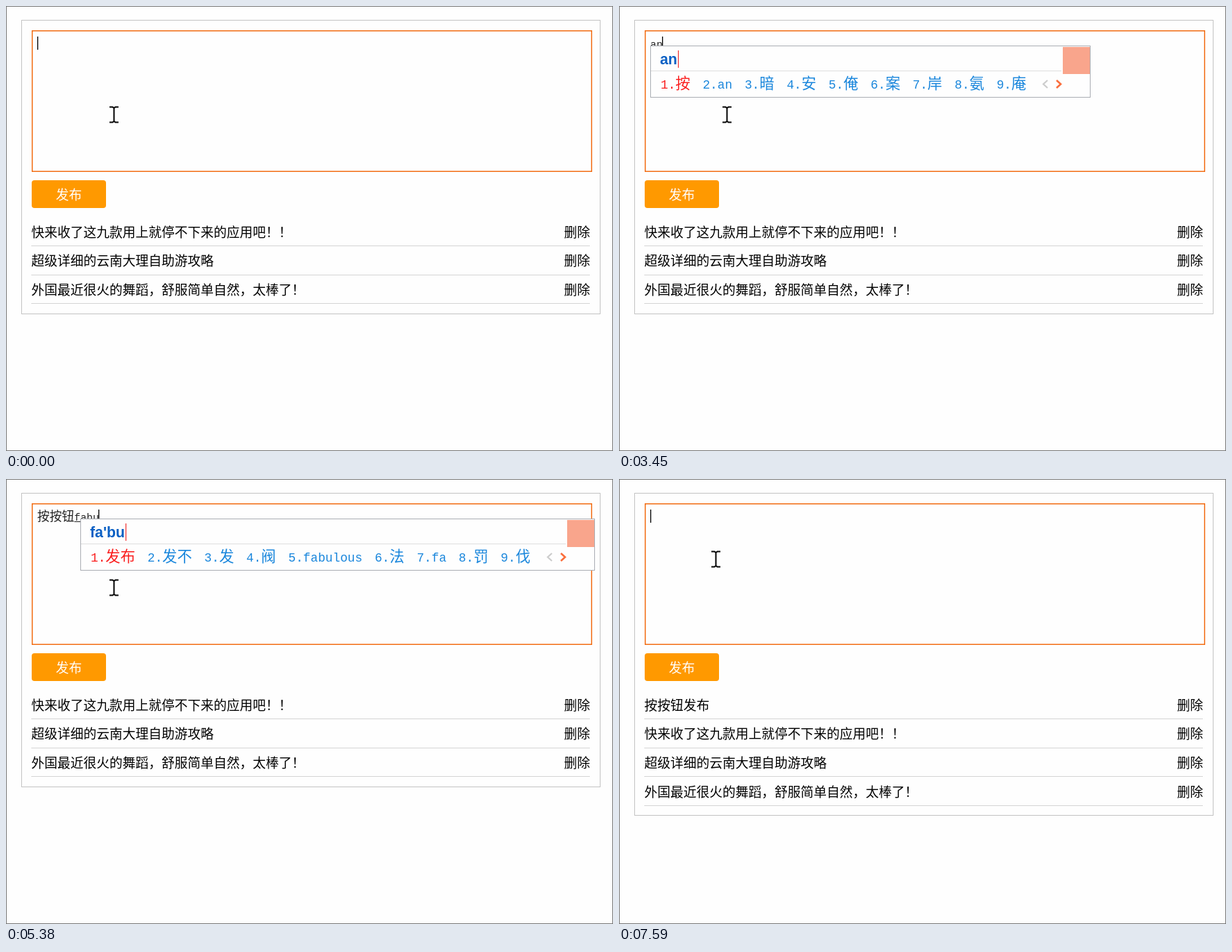
An HTML page for the animation above (8000 ms loop, 874 by 641 pixels).

```html
<!DOCTYPE html>
<html lang="zh-CN">
<head>
<meta charset="utf-8">
<title>发布</title>
<style>
html, body { margin: 0; width: 100%; height: 100%; overflow: hidden; background: #fefefe; }
svg { display: block; width: 874px; height: 641px; }
text { font-family: "Noto Sans CJK SC", "Noto Sans CJK", sans-serif; white-space: pre; }
.ui { font-size: 18.75px; fill: #000; }
.song { font-weight: 300; }
.song .half { font-family: "Liberation Mono", monospace; }
.pinyin { font: bold 21.33px "Liberation Sans", sans-serif; fill: #0a60c4; }
.hint { font-size: 18px; font-weight: 300; fill: #aaa; }
</style>
</head>
<body>
<svg id="stage" viewBox="0 0 874 641"></svg>
<script>
const LOOP = 8000, LEFT = 45, EM = 17.78, CAND_EM = 21.33;

const POSTS = ['快来收了这九款用上就停不下来的应用吧！！', '超级详细的云南大理自助游攻略', '外国最近很火的舞蹈，舒服简单自然，太棒了！'];

const WORDS = {
  an: '按 an 暗 安 俺 案 岸 氨 庵',
  "an'u": '按钮 俺奶奶 安暖 安能 Olv 按捺 按你 安宁 按年',
  fa: '发 法 阀 罚 fa 伐 乏 筏 珐',
  "fa'bu": '发布 发不 发 阀 fabulous 法 fa 罚 伐'
};

// Each step changes only the listed fields.
const STEPS = [
  [0, { text: '', comp: '', ime: null, hint: false, caret: true, selected: false, focus: true, posts: POSTS, mouse: ['beam', 155.5, 156.5] }],
  [560, { caret: false }],
  [1000, { text: '1', caret: true }],
  [1280, { text: '11' }],
  [1400, { text: '111' }],
  [1710, { text: '1111' }],
  [2270, { selected: true, caret: false }],
  [3450, { text: '', comp: 'an', ime: ['an', 45], selected: false, caret: true }],
  [3830, { hint: true }],
  [3970, { ime: null, hint: false }],
  [4100, { text: '按', comp: '' }],
  [4380, { comp: 'an', ime: ['an', 72] }],
  [4520, { comp: 'anu', ime: ["an'u", 72] }],
  [4950, { text: '按按钮', comp: '', ime: null }],
  [5100, { comp: 'fa', ime: ['fa', 107] }],
  [5380, { comp: 'fabu', ime: ["fa'bu", 107] }],
  [5500, { text: '按按钮发布', comp: '', ime: null }],
  [6060, { caret: false }],
  [6180, { mouse: ['beam', 146.5, 176.5] }],
  [6300, { mouse: ['beam', 128.5, 203.5] }],
  [6450, { mouse: ['beam', 115.5, 227.5] }],
  [6600, { caret: true, mouse: ['arrow', 99.5, 260.5] }],
  [6760, { caret: false, focus: false }],
  [6880, { text: '', posts: ['按按钮发布', ...POSTS] }],
  [7310, { mouse: ['beam', 128.5, 198.5] }],
  [7440, { mouse: ['beam', 139.5, 115.5] }],
  [7590, { caret: true, focus: true }]
];

const stage = document.getElementById('stage');

function add(tag, attrs, content = '') {
  const el = document.createElementNS('http://www.w3.org/2000/svg', tag);
  for (const key in attrs) el.setAttribute(key, attrs[key]);
  el.textContent = content;
  stage.append(el);
  return el;
}

const rect = (x, y, width, height, fill, more) => add('rect', { x, y, width, height, fill, ...more });
const frame = (x, y, w, h, stroke, line = 1) =>
  rect(x + line / 2, y + line / 2, w - line, h - line, 'none', { stroke, 'stroke-width': line });
const path = (d, stroke, line, more) => add('path', { d, fill: 'none', stroke, 'stroke-width': line, ...more });
const label = (x, y, cls, str, more) => add('text', { x, y, class: cls, ...more }, str);
const units = str => [...str].reduce((n, c) => n + (c < '\u0100' ? 0.5 : 1), 0);

// Half-width characters take exactly half an em next to full-width ones.
function song(x, y, str, em, fill) {
  const el = label(x, y, 'song', '', { fill, 'font-size': em });
  for (const run of str.match(/[\x00-\xff]+|[^\x00-\xff]+/g) || []) {
    const span = document.createElementNS(el.namespaceURI, 'tspan');
    span.textContent = run;
    if (run < '\u0100') {
      span.setAttribute('class', 'half');
      span.style.fontSize = em / 1.2 + 'px';
    }
    el.append(span);
  }
}

function drawPage(s) {
  rect(0, 0, 874, 641, '#fefefe');
  frame(0, 0, 874, 641, '#777');
  frame(22, 20, 834, Math.round(423.5 + 41.6 * (s.posts.length - 3)), '#c3c3c3');
  if (s.focus) frame(37, 35, 807, 204, '#f26c12', 1.5);
  else frame(37, 35, 807, 204, '#a9a9a9');

  rect(37, 251, 107, 40, '#ff9900', { rx: 4 });
  label(90.5, 279, 'ui', '发布', { 'text-anchor': 'middle', style: 'fill:#fff' });

  s.posts.forEach((post, i) => {
    const y = 41.6 * i;
    label(36.5, 332.8 + y, 'ui', post);
    label(841, 332.8 + y, 'ui', '删除', { 'text-anchor': 'end' });
    path(`M37 ${Math.round(345 + y) + 0.5}H841`, '#aaa', 1, { 'stroke-dasharray': '1 1' });
  });
}

function drawInput(s) {
  const start = LEFT + units(s.text) * EM;
  const end = start + units(s.comp) * EM;
  if (s.selected) rect(LEFT, 44, 36, 19, '#3390ff');
  song(LEFT, 60.3, s.text + s.comp, EM, s.selected ? '#fff' : '#222');
  if (s.comp) rect(start, 61, end - start, 1, '#222');
  if (s.caret) rect(Math.floor(end), 44, 1.3, 19, '#000');
}

function drawIme([typed, x], hint) {
  const words = WORDS[typed].split(' ').map((word, i) => `${i + 1}.${word}`);
  const gap = 17.8;
  const width = Math.round(words.reduce((sum, w) => sum + units(w) * CAND_EM + gap, 0) - gap + 108);
  const right = x + width;
  rect(x, 57, width, 75, '#fefefe');
  frame(x, 57, width, 75, '#aaadb3');
  rect(x + 1, 93, width - 43, 1, '#dedede');

  const pinyin = label(x + 14, 84, 'pinyin', typed);
  rect(x + 15 + pinyin.getComputedTextLength(), 64, 1.2, 25, '#f03030');
  if (hint) label(x + 82, 82, 'hint', '工具箱（分号）');

  let pos = x + 15;
  words.forEach((word, i) => {
    song(pos, 119.3, word, CAND_EM, i ? '#1b87dc' : '#fa1e1e');
    pos += units(word) * CAND_EM + gap;
  });
  path(`M${right - 62} 107l-6 5.5l6 5.5`, '#ccc', 2.2);
  path(`M${right - 49} 107l6 5.5l-6 5.5`, '#fa6e3c', 2.6);
  rect(right - 40, 59, 39, 39, '#f9a58c');
}

function drawMouse([kind, x, y]) {
  const transform = `translate(${x} ${y})`;
  if (kind === 'beam') {
    path('M-6.5 -11H-2L0 -9.5L2 -11H6.5M0 -10V10M-6.5 11H-2L0 9.5L2 11H6.5', '#000', 2, { transform });
  } else {
    path('M0 0V25L6 19.5L10 28L14 26.5L10 18H17.5Z', '#000', 1.2, { transform, style: 'fill:#fff' });
  }
}

function draw(s) {
  stage.replaceChildren();
  drawPage(s);
  drawInput(s);
  if (s.ime) drawIme(s.ime, s.hint);
  drawMouse(s.mouse);
}

let shown = -1;
const begin = performance.now();
function tick() {
  const t = (performance.now() - begin) % LOOP;
  const index = STEPS.filter(([at]) => at <= t).length - 1;
  if (index !== shown) {
    shown = index;
    draw(Object.assign({}, ...STEPS.slice(0, index + 1).map(step => step[1])));
  }
  requestAnimationFrame(tick);
}
tick();
</script>
</body>
</html>
```
